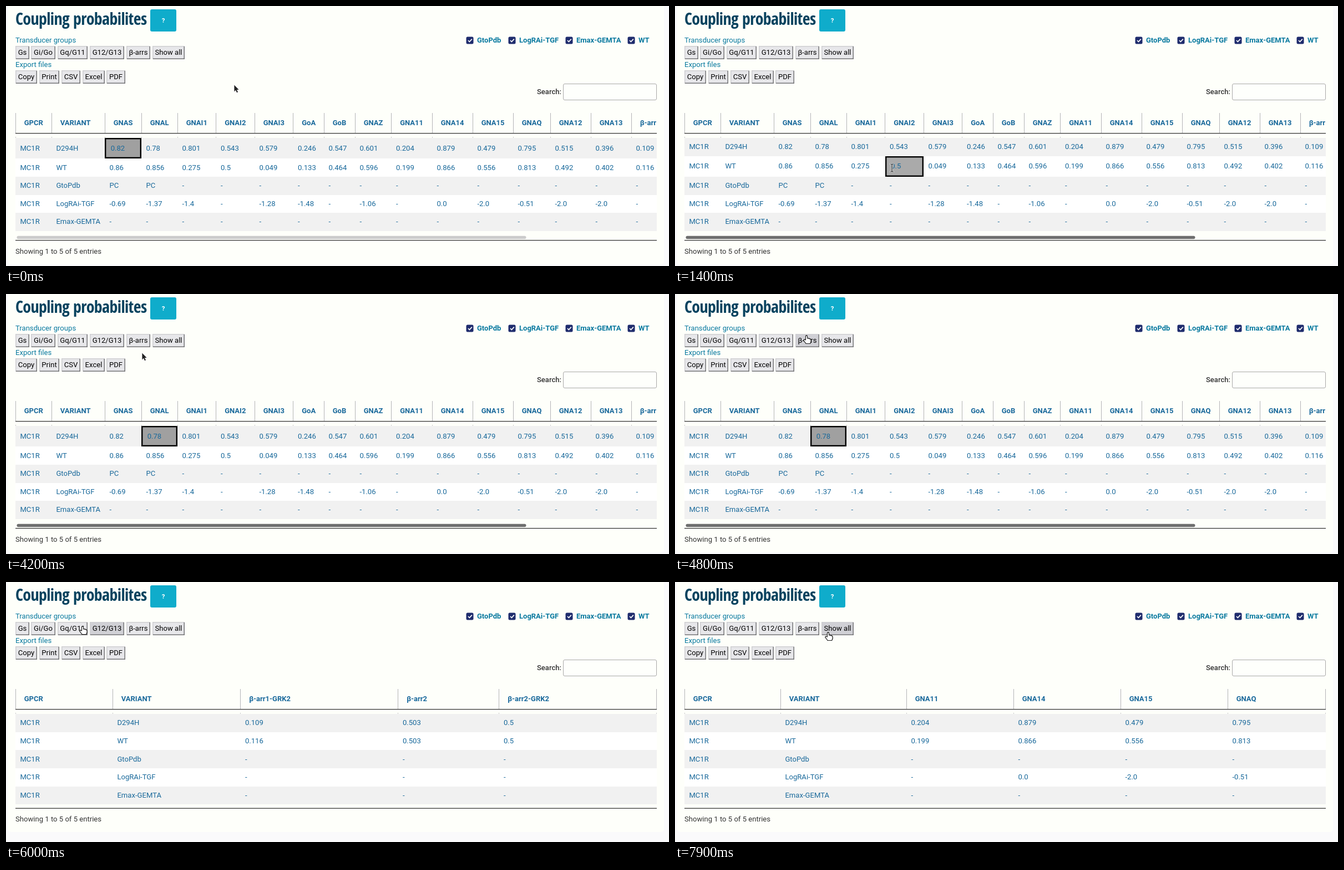
Recreate the animation shown at these times as an HTML page with a canvas. Size 1195 px wide and 469 px high, loop 8000 ms.

```html
<!DOCTYPE html>
<html lang="en">
<head>
<meta charset="utf-8">
<title>Coupling probabilities</title>
<style>
  html, body { margin: 0; width: 100%; height: 100%; overflow: hidden; background: #fafafa; }
  canvas { display: block; }
  h1 {
    position: absolute; left: 17px; top: 3px; margin: 0; line-height: 40px; white-space: nowrap;
    color: #07435f; font-size: 34px; font-weight: 700; letter-spacing: -.02em;
    font-stretch: extra-condensed; font-variation-settings: "wdth" 70;
  }
</style>
</head>
<body>
<canvas id="stage" width="1195" height="469"></canvas>
<h1 id="title">Coupling probabilites</h1>
<script>
const ctx = document.getElementById('stage').getContext('2d');
const title = document.getElementById('title');
const LOOP = 8000, STEP = 100, RIGHT = 1172.5, ROW = 32.65, ROW_SELECTED = 37.3;
const BLUE = '#19699b', TEAL = '#08799f';

const variants = ['D294H', 'WT', 'GtoPdb', 'LogRAi-TGF', 'Emax-GEMTA'];
const data = {};
`GNAS 0.82 0.86 PC -0.69 -
GNAL 0.78 0.856 PC -1.37 -
GNAI1 0.801 0.275 - -1.4 -
GNAI2 0.543 0.5 - - -
GNAI3 0.579 0.049 - -1.28 -
GoA 0.246 0.133 - -1.48 -
GoB 0.547 0.464 - - -
GNAZ 0.601 0.596 - -1.06 -
GNA11 0.204 0.199 - - -
GNA14 0.879 0.866 - 0.0 -
GNA15 0.479 0.556 - -2.0 -
GNAQ 0.795 0.813 - -0.51 -
GNA12 0.515 0.492 - -2.0 -
GNA13 0.396 0.402 - -2.0 -
β-arr1-GRK2 0.109 0.116 - - -
β-arr2 0.503 0.503 - - -
β-arr2-GRK2 0.5 0.5 - - -`.split('\n').forEach(line => {
  const [name, ...values] = line.split(' ');
  data[name] = values;
});
const names = Object.keys(data);
data.GPCR = Array(5).fill('MC1R');
data.VARIANT = variants;

const view = (xs, cols, wide) => ({ xs, cols: ['GPCR', 'VARIANT', ...cols], wide });
const allView = view([17, 82, 178, 244, 309, 378.5, 448, 517.5, 573, 629, 694.5, 768, 841, 914, 981, 1054, 1127],
  names.slice(0, 15), true);
const arrestinView = view([17, 192, 422.5, 706.5, 888.5], names.slice(14));
const gqView = view([17, 190, 417, 610, 803, 996], names.slice(8, 12));

const buttons = [
  ['Gs', 17, 42], ['Gi/Go', 45, 89], ['Gq/G11', 93, 147], ['G12/G13', 151, 213],
  ['β-arrs', 217, 260], ['Show all', 264, 322]
].map(b => [...b, 72]).concat([
  ['Copy', 17, 56], ['Print', 60, 96], ['CSV', 100, 134], ['Excel', 138, 178], ['PDF', 181, 215]
].map(b => [...b, 116]));

// Pointer hot spot: time, x, y
const path = [
  [0, 411, 142], [300, 402, 180], [600, 382, 271], [700, 382, 271], [800, 386, 295], [900, 391, 292],
  [2100, 391, 292], [2200, 396, 294], [2400, 350, 277], [2700, 274, 250], [3000, 274, 250],
  [3200, 271, 252], [3600, 271, 252], [3900, 271, 215], [4200, 245, 106], [4500, 240, 78],
  [4800, 237, 75], [5400, 237, 75], [5700, 165, 82], [5800, 165, 82], [6100, 125, 79],
  [7200, 125, 79], [7500, 188, 93], [7800, 275, 92], [7900, 276, 91]
];

function pointerAt(t) {
  const i = path.findIndex(p => p[0] > t);
  if (i < 1) return path[i < 0 ? path.length - 1 : 0].slice(1);
  const [t0, x0, y0] = path[i - 1], [t1, x1, y1] = path[i], k = (t - t0) / (t1 - t0);
  return [x0 + (x1 - x0) * k, y0 + (y1 - y0) * k];
}

// Pick the narrowest installed condensed face and the largest size with room beside the button
function setTitleFont() {
  const width = family => {
    title.style.fontFamily = `${family}, sans-serif`;
    return title.offsetWidth;
  };
  const families = ['"Roboto Condensed", Roboto', '"Open Sans Condensed", "Open Sans"', '"Noto Sans"',
    '"Liberation Sans Narrow", Roboto'];
  const best = families.reduce((a, b) => width(b) < width(a) ? b : a);
  title.style.fontSize = `${Math.min(34, 34 * 237 / width(best))}px`;
}

function rect(x, y, w, h, color) {
  ctx.fillStyle = color;
  ctx.fillRect(x, y, w, h);
}

function round(x, y, w, h, r, fill, stroke) {
  ctx.beginPath();
  ctx.roundRect(x, y, w, h, r);
  if (fill) { ctx.fillStyle = fill; ctx.fill(); }
  if (stroke) { ctx.strokeStyle = stroke; ctx.lineWidth = 1; ctx.stroke(); }
}

// y is the middle of the capital letters
function text(s, x, y, color, weight = 400, size = 13.1, align = 'left') {
  ctx.font = `${weight} ${size}px Roboto, sans-serif`;
  ctx.textAlign = align;
  ctx.fillStyle = color;
  ctx.fillText(s, x, Math.round(y + size * 0.36));
}

function drawButton([label, x0, x1, y], hovered) {
  const w = x1 - x0;
  rect(x0, y, w, 24, '#cfcfd2');
  rect(x0 + 1, y + 22.3, w - 1, 1.7, '#77777a');
  rect(x1 - 1.7, y + 1, 1.7, 23, '#77777a');
  rect(x0 + 1.5, y + 1.5, w - 3.2, 20.8, hovered ? '#d0d0d5' : '#e7e7ea');
  text(label, x0 + w / 2, y + 11.7, '#000', 400, 13.1, 'center');
}

function drawTop(hovered) {
  round(260, 6, 47, 40, 3, '#0faccb');
  text('?', 283.5, 25.5, '#fff', 700, 11.5, 'center');
  text('Transducer groups', 17, 61.5, TEAL);
  text('Export files', 17, 105.5, TEAL);
  for (const b of buttons) drawButton(b, b === hovered);

  [['GtoPdb', 830], ['LogRAi-TGF', 906], ['Emax-GEMTA', 1009], ['WT', 1121]].forEach(([label, x]) => {
    round(x - 0.5, 55.5, 13, 13, 2.5, '#1f2c6d');
    ctx.strokeStyle = '#fff';
    ctx.lineWidth = 1.7;
    ctx.stroke(new Path2D(`M${x + 3} 62l2.4 2.6 4.4-5`));
    text(label, x + 19, 61.7, TEAL, 700, 13);
  });
  text('Search:', 1001, 154.5, '#333', 500, 13.1, 'right');
  round(1004.5, 140.5, 168, 29, 2.5, '#fefffc', '#a9a9a9');
}

function drawTable({ xs, cols, wide }, selected, barColor) {
  ctx.save();
  ctx.beginPath();
  ctx.rect(16, 190, RIGHT - 15.5, 220);
  ctx.clip();
  const edges = wide ? xs : [...xs, 1172];
  for (const x of edges) {
    rect(Math.floor(x), 193, 1, 36, '#b4b4b8');
    rect(Math.floor(x), 236, 1, 1.5, '#b4b4b8');
  }
  cols.forEach((name, c) => text(name, xs[c] + 15.7, 210.3, BLUE, 700, 13));
  rect(17, 229, 1156, 1.3, '#3a3a3a');

  let y = 238;
  variants.forEach((_, r) => {
    const active = selected && selected[1] === r, h = active ? ROW_SELECTED : ROW;
    const top = Math.round(y), height = Math.round(y + h) - top;
    rect(17, top, 1156, height, r % 2 ? '#fff' : '#f1f1f1');
    cols.forEach((name, c) => {
      const on = active && selected[0] === name;
      if (on) {
        const left = Math.round(xs[c]), w = Math.round(xs[c + 1]) - left;
        rect(left, top, w, height, '#000');
        rect(left + 2.4, top + 2.4, w - 4.8, height - 4.8, r % 2 ? '#aaa' : '#a0a0a0');
      }
      text(data[name][r], xs[c] + (on ? 10.7 : 8.4), y + h / 2 - 0.8, BLUE);
    });
    y += h;
  });
  ctx.restore();
  if (wide) round(19.5, 414.8, 918, 5.4, 2.7, barColor);
  rect(17, wide ? 422 : 407.6, 1156, 1.3, '#3a3a3a');
  text('Showing 1 to 5 of 5 entries', 17, wide ? 442 : 427.5, '#333');
}

function drawPointer(x, y) {
  x = Math.round(x);
  y = Math.round(y);
  const overButton = buttons.some(b => inside(b, x, y));
  ctx.save();
  ctx.translate(x, y);
  ctx.lineJoin = ctx.lineCap = 'round';
  if (y > 238) {
    const beam = new Path2D('M-2.5-7Q0-7 0-5.5Q0-7 2.5-7M0-5.5V5.5M-2.5 7Q0 7 0 5.5Q0 7 2.5 7');
    ctx.strokeStyle = 'rgba(255,255,255,.7)';
    ctx.lineWidth = 2.6;
    ctx.stroke(beam);
    ctx.strokeStyle = '#222';
    ctx.lineWidth = 1.1;
    ctx.stroke(beam);
  } else {
    const hand = overButton || y > 193;
    const shape = new Path2D(hand
      ? 'M-1.5 8V1Q0-1.2 1.5 1V5Q3 4 4.2 5.6Q5.8 5 6.6 6.5Q8 6 8 8V11Q7.5 13 6.5 14.5H-.8Q-2.5 12-5 9Q-5.2 6.8-3.2 7.2Z'
      : 'M.4.6V12.4L3.1 9.8L5 14.2L7 13.3L5.1 9H8.6Z');
    ctx.strokeStyle = hand ? '#222' : '#fff';
    ctx.lineWidth = hand ? 1.1 : 1.6;
    ctx.fillStyle = hand ? '#fff' : '#222';
    ctx.stroke(shape);
    ctx.fill(shape);
    if (hand) ctx.stroke(shape);
  }
  ctx.restore();
}

function inside([, x0, x1, top], x, y) {
  return x >= x0 && x <= x1 && y >= top && y <= top + 24;
}

function draw(t) {
  const table = t < 5100 ? allView : t < 6700 ? arrestinView : gqView;
  const selected = t < 1300 ? ['GNAS', 0] : t < 3400 ? ['GNAI2', 1] : ['GNAL', 0];
  const [hx, hy] = pointerAt(t - STEP);
  rect(0, 0, 1195, 469, '#fafafb');
  round(4, -10, 1182, table.wide ? 476 : 461, 5, '#fefffa');
  drawTop(buttons.find(b => inside(b, hx, hy)));
  drawTable(table, table.wide && selected, t < 1300 ? '#cbcbcb' : t < 1400 ? '#9c9c9c' : '#6e6e6e');
  drawPointer(...pointerAt(t));
}

function tick() {
  draw(Math.floor(performance.now() % LOOP / STEP) * STEP);
  requestAnimationFrame(tick);
}
setTitleFont();
tick();
</script>
</body>
</html>
```
